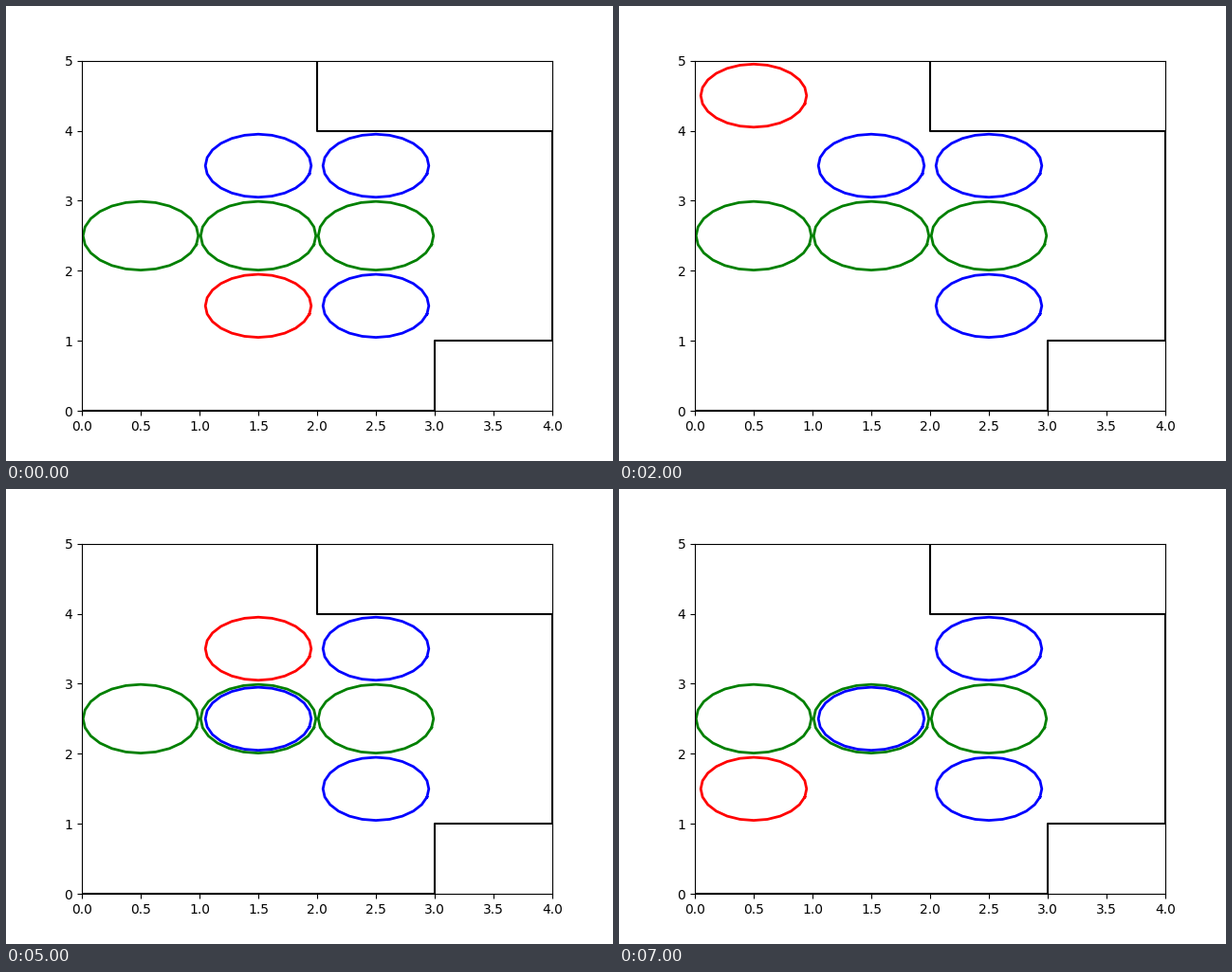
A matplotlib script for the animation above (8 s loop, 640 by 480 pixels).

```python
import numpy as np
import matplotlib.pyplot as plt
from matplotlib.animation import FuncAnimation

STEP_MS = 1000
GOAL_R, BODY_R = 0.49, 0.45

# One vertex every 15 degrees, the seam just below the right tip
theta = np.radians(np.arange(-15, 346, 15))


def cell(col, row):
    return np.array([col + 0.5, row + 0.5])


def ring(center, radius):
    x, y = center
    return x + radius * np.cos(theta), y + radius * np.sin(theta)


def touching(box):
    """Place of the player resting on top of a box."""
    return box + (0, 2 * BODY_R)


fig, ax = plt.subplots(figsize=(6.4, 4.8), dpi=100)
ax.set_xlim(0, 4)
ax.set_ylim(0, 5)

# The wall turns a right angle after every run
wall = [(0, 0)]
for i, run in enumerate((3, 1, 1, 3, -2, 1)):
    x, y = wall[-1]
    wall.append((x, y + run) if i % 2 else (x + run, y))
ax.plot(*zip(*wall), color="black", lw=1.5)

for col in range(3):
    ax.plot(*ring(cell(col, 2), GOAL_R), color="green", lw=2)
player, = ax.plot([], [], color="red", lw=2)
pushed, = ax.plot([], [], color="blue", lw=2)
for row in (3, 1):
    ax.plot(*ring(cell(2, row), BODY_R), color="blue", lw=2)

# Walk round the box, push it down one cell, step back and walk away
box_start, box_end, corner = cell(1, 3), cell(1, 2), cell(0, 4)
walk = [cell(1, 1), cell(0, 2), corner, touching(box_start)]
push_step = len(walk)
walk += [touching(box_end), box_start, corner, cell(0, 1)]


def update(step):
    player.set_data(*ring(walk[step], BODY_R))
    box = box_start if step < push_step else box_end
    pushed.set_data(*ring(box, BODY_R))
    return player, pushed


anim = FuncAnimation(fig, update, frames=len(walk), interval=STEP_MS,
                     init_func=lambda: update(0), repeat=True, repeat_delay=0)
plt.show()
```
